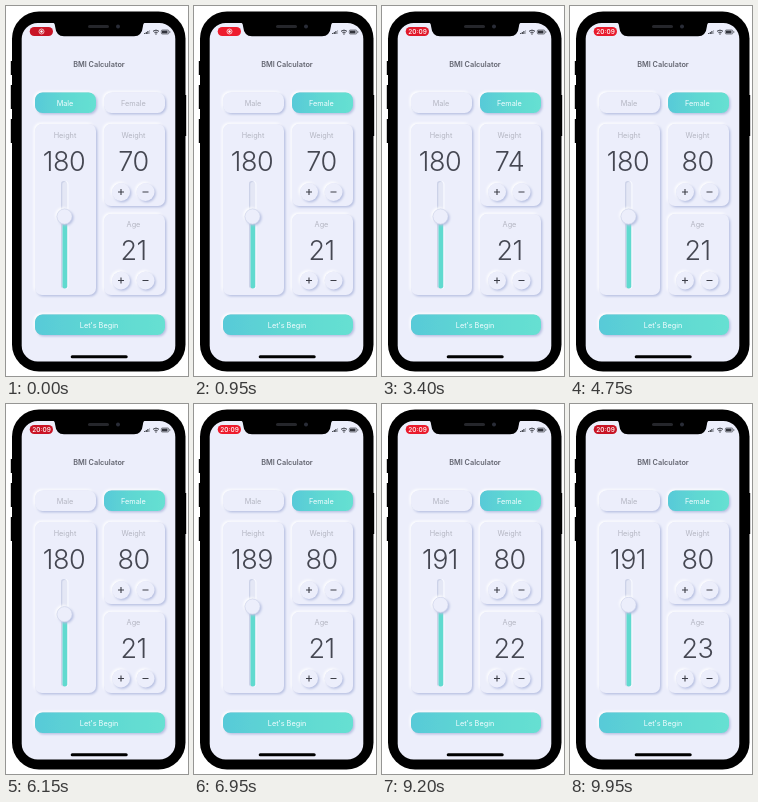
Write an HTML page that moves like this. It is 182 by 370 pixels and loops after 10000 ms.

```html
<!DOCTYPE html>
<html lang="en">
<head>
<meta charset="utf-8">
<title>BMI Calculator</title>
<style>
  html, body { margin: 0; width: 100%; height: 100%; overflow: hidden; background: #fff; }
  svg { display: block; width: 182px; height: 370px; }
  text { font-family: Inter, Roboto, sans-serif; font-size: 7.3px; text-anchor: middle; fill: #b4b6c2; }
  .title { font-weight: 600; fill: #62646f; }
  .value { font-size: 27px; font-weight: 300; letter-spacing: -.5px; fill: #454752; }
  .sign { stroke: #3c3e48; stroke-width: 1.1; }
  .soft { fill: #eceefb; filter: url(#raised); }
  .on { fill: url(#teal); }
  .on + text, .start { fill: #f4fcff; }
</style>
</head>
<body>
<svg viewBox="0 0 182 370">
  <defs>
    <linearGradient id="teal">
      <stop offset="0" stop-color="#58cad8"/>
      <stop offset=".5" stop-color="#5fd8d2"/>
      <stop offset="1" stop-color="#66e0d2"/>
    </linearGradient>
    <filter id="raised" x="-30%" y="-50%" width="160%" height="200%">
      <feDropShadow dx="-1.2" dy="-1.2" stdDeviation="1.2" flood-color="#fff" result="lit"/>
      <feDropShadow in="SourceGraphic" dx="1.3" dy="1.3" stdDeviation="1.1" flood-color="#b4bde0" result="shade"/>
      <feMerge><feMergeNode in="lit"/><feMergeNode in="shade"/></feMerge>
    </filter>
  </defs>

  <path d="M5.5 55v14m0 10v24m0 10v24M179.5 89v41" stroke="#000" stroke-width="1.4"/>
  <rect x="6" y="5.5" width="173.5" height="360" rx="27"/>
  <rect x="15.7" y="17" width="153.6" height="338.5" rx="16" fill="#eceefb"/>
  <path d="M46 16H140Q137 17 137 20Q136 30.3 128 30.3H58Q50 30.3 49 20Q49 17 46 16Z"/>
  <rect x="82" y="19" width="21" height="3" rx="1.5" fill="#25262b"/>
  <circle cx="112" cy="20.5" r="2" fill="#292c37"/>
  <rect x="64.7" y="349.3" width="57" height="3" rx="1.5"/>

  <rect id="pill" x="23.7" y="21" width="23.3" height="9" rx="4.5"/>
  <g id="recording" fill="none" stroke="#fff" stroke-width=".7">
    <circle cx="35.5" cy="25.5" r="2.5"/>
    <circle cx="35.5" cy="25.5" r="1.2" fill="#fff" stroke="none"/>
  </g>
  <text id="clock" x="35.5" y="27.9" style="font-size:6.5px;font-weight:500;fill:#fff">20:09</text>

  <g fill="none" stroke="#32343c">
    <path d="M138.7 28v-1M140.3 28v-2M141.9 28v-3" stroke-width="1.1"/>
    <path d="M143.5 28v-4" stroke="#b5b7c2" stroke-width="1.1"/>
    <path d="M147 25.3q3-2.5 6 0M148.4 26.7q1.6-1.3 3.2 0" stroke-width="1"/>
    <circle cx="150" cy="28" r=".3"/>
    <rect x="155.3" y="24" width="7.5" height="4" rx="1" stroke-width=".6"/>
    <path d="M156 26h5.5" stroke-width="2.8"/>
    <path d="M163.8 25.2v1.6" stroke-width=".7"/>
  </g>

  <text class="title" x="93" y="61">BMI Calculator</text>
  <rect id="male" class="soft" x="29" y="86.5" width="61" height="20.5" rx="7.5"/>
  <text x="59" y="99.5">Male</text>
  <rect id="female" class="soft" x="98" y="86.5" width="61" height="20.5" rx="7.5"/>
  <text x="127.5" y="99.5">Female</text>

  <rect class="soft" x="29" y="118" width="61" height="171" rx="7"/>
  <rect class="soft" x="98" y="118" width="61" height="82" rx="7"/>
  <rect class="soft" x="98" y="208" width="61" height="81" rx="7"/>
  <text x="59" y="131.5">Height</text>
  <text x="127.5" y="131.5">Weight</text>
  <text x="127.5" y="221">Age</text>
  <text id="height" class="value" x="58" y="165"></text>
  <text id="weight" class="value" x="127.5" y="165"></text>
  <text id="age" class="value" x="127.5" y="253.5"></text>

  <rect x="55.5" y="175" width="7" height="108" rx="3.5" fill="#f8f9ff"/>
  <rect x="55" y="175" width="5.5" height="107.5" rx="2.7" fill="#ccd2e8"/>
  <rect x="56.3" y="176" width="5" height="106.5" rx="2.5" fill="#e4e7f5"/>
  <rect id="fill" x="56.5" width="4.7" rx="2.3" fill="#60dacf"/>
  <circle id="knob" class="soft" cx="58.5" r="7.5" stroke="#d3d8ec" stroke-width=".6"/>

  <g id="steppers"></g>
  <rect class="soft on" x="29" y="308.5" width="130" height="20.5" rx="7.5"/>
  <text class="start" x="93" y="321.5">Let's Begin</text>
</svg>
<script>
  const LOOP = 10000;
  const el = id => document.getElementById(id);
  const clamp = (v, lo, hi) => Math.min(hi, Math.max(lo, v));

  el('steppers').innerHTML = [186, 274.5].map(y => `
    <circle class="soft" cx="115" cy="${y}" r="9"/>
    <circle class="soft" cx="139.5" cy="${y}" r="9"/>
    <path class="sign" d="M112 ${y}h6m-3-3v6M136.5 ${y}h6"/>`).join('');

  // Number of evenly spaced taps made by time t
  const taps = (t, start, gap, total) => clamp(Math.floor((t - start) / gap) + 1, 0, total);

  function draw(t) {
    const female = t >= 500;
    el('male').classList.toggle('on', !female);
    el('female').classList.toggle('on', female);

    // The status pill pulses every two seconds
    const glow = .5 - .5 * Math.cos(t / 1000 * Math.PI);
    el('pill').setAttribute('fill', `rgb(${200 + 38 * glow},${20 + 8 * glow},${38 + 8 * glow})`);
    const showClock = clamp((t - 1700) / 300, 0, 1);
    el('recording').style.opacity = 1 - showClock;
    el('clock').style.opacity = showClock;

    const first = clamp((t - 6050) / 850, 0, 1);
    const second = clamp((t - 7100) / 800, 0, 1);
    const ease = p => p * p * (3 - 2 * p);
    const height = 180 + 9 * ease(first) + 2 * ease(second);
    const y = 210.5 - (height - 180) * .88;
    el('height').textContent = Math.round(height);
    el('knob').setAttribute('cy', y);
    el('fill').setAttribute('y', y);
    el('fill').setAttribute('height', 282.5 - y);

    el('weight').textContent = 70 + taps(t, 2650, 190, 10);
    el('age').textContent = 21 + taps(t, 9000, 450, 2);
  }

  function tick() {
    draw(performance.now() % LOOP);
    requestAnimationFrame(tick);
  }
  tick();
</script>
</body>
</html>
```
